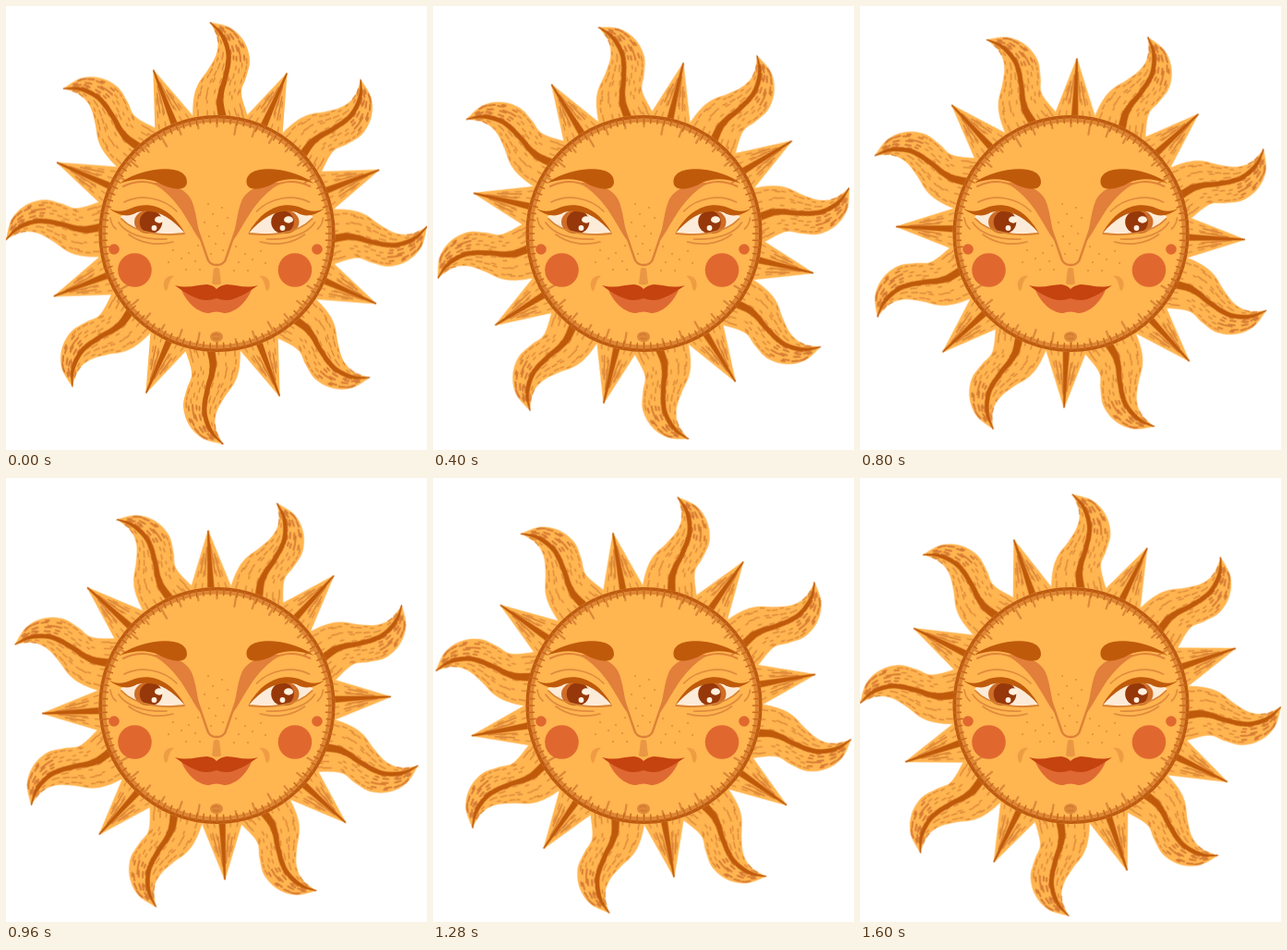
Recreate the animation shown at these times as an HTML page. Size 456x480 px, loop 1680 ms.

```html
<!DOCTYPE html>
<html lang="en">
<head>
<meta charset="utf-8">
<title>Smiling sun</title>
<style>
  html, body { margin: 0; width: 100%; height: 100%; overflow: hidden; background: #fff; }
  svg { display: block; width: 100%; height: 100%; }
  #rays { animation: turn 1680ms infinite; }
  /* One eighth of a turn in held 80 ms poses, with a short rest after the middle. */
  @keyframes turn {
    0%        { transform: rotate(0deg); animation-timing-function: steps(5); }
    23.80952% { transform: rotate(-10.6deg); animation-timing-function: steps(3); }
    38.09524% { transform: rotate(-17.4deg); animation-timing-function: steps(2); }
    47.61905% { transform: rotate(-21.7deg); animation-timing-function: steps(2); }
    57.14286% { transform: rotate(-26.55deg); animation-timing-function: steps(1); }
    61.90476% { transform: rotate(-26.55deg); animation-timing-function: steps(3); }
    76.19048% { transform: rotate(-33.9deg); animation-timing-function: steps(4); }
    95.2381%  { transform: rotate(-42.75deg); animation-timing-function: steps(1); }
    100%      { transform: rotate(-45deg); }
  }
  .gold { fill: #ffb550; }
  .brown { fill: #bf5a0b; }
  .lines { fill: none; stroke-linecap: round; stroke-linejoin: round; }
</style>
</head>
<body>
<svg viewBox="0 0 456 480">
  <defs>
    <g id="wave"></g>
    <g id="spike"></g>
    <g id="halfFace">
      <path fill="#e17f3b" d="M158 191C180 191 195 198 201 210C206 222 207 236 211 254C199 240 190 209 158 191Z"/>
      <path class="lines" stroke="#dc8138" stroke-width="2.4" d="M206 238C212 254 216 267 219 275Q222 280 228 280"/>
      <path class="lines" stroke="#e08337" stroke-width="2" d="M127 195C142 188 157 189 169 196"/>
      <path class="brown" d="M196 190C196 178 181 175 166 176.500C148 178.500 135 183 123 192C140 186 153 186 165 191C177 198 196 202 196 190Z"/>
      <path class="lines" stroke="#e08b3c" stroke-width="1.700" d="M128 212C146 203 170 207 185 222M122 234C130 246 148 253 174 252M133 247C148 258 166 259 181 255M113 229Q114 237 119 241"/>
      <path fill="#fcebd8" d="M124 228C140 214 174 215 193 245C169 248 139 246 124 228Z"/>
      <ellipse cx="153" cy="233.500" rx="14" ry="12.500" fill="#cf6d27"/>
      <circle cx="157" cy="233.500" r="12.300" fill="#96380a"/>
      <path class="brown" d="M111 218C120 224 128 222 137 218C158 210 180 220 194 246C178 227 160 218 142 223C133 229 121 227 111 218Z"/>
      <path class="lines" stroke="#d78336" stroke-width="1.800" d="M125 230C140 246 169 249 193 246"/>
      <path fill="#ef9d42" d="M182 292C172 290 168 301 173 308C177 307 174 298 182 292Z"/>
    </g>
  </defs>

  <g transform="translate(228 245.500)"><g id="rays"></g></g>

  <circle class="gold" cx="228.500" cy="246" r="128"/>
  <g class="lines">
    <path id="marks" stroke="#dd8738" stroke-width="2.200"/>
    <circle cx="228.500" cy="246" r="122.500" stroke="#dd8735" stroke-width="4"/>
    <circle cx="228.500" cy="246" r="126.300" stroke="#bd5b11" stroke-width="3.600"/>
    <path id="ticks" stroke="#c9681d" stroke-width="1.500"/>
  </g>
  <use href="#halfFace"/>
  <use href="#halfFace" transform="translate(456.500) scale(-1 1)"/>
  <g fill="#e0682f">
    <circle cx="139.500" cy="285.500" r="18.300"/><circle cx="313" cy="285.500" r="18.300"/>
    <circle cx="117" cy="263" r="5.800"/><circle cx="337" cy="263" r="5.800"/>
  </g>
  <g fill="#fff0df">
    <ellipse cx="166" cy="231" rx="5" ry="3.700"/><circle cx="160.500" cy="240" r="2.900"/>
    <ellipse cx="306" cy="231" rx="5" ry="3.700"/><circle cx="299.500" cy="240" r="2.900"/>
  </g>
  <path fill="#e99743" d="M225 284Q228 282 231 284L233 300Q228 303 223 300Z"/>
  <path fill="#df6932" d="M190 307C206 313 250 313 266 307C258 325 245 332 236 332Q228 329 220 332C211 332 198 325 190 307Z"/>
  <path fill="#c4430f" d="M183 302C198 306 207 301 218 301Q225 302 228 306Q232 302 239 301C249 301 259 306 273 302C259 312 247 318 239 318Q233 318 228 316Q223 318 217 318C208 318 196 312 183 302Z"/>
  <ellipse cx="228" cy="357.500" rx="7" ry="5.500" fill="#dd8938"/>
  <path class="lines" stroke="#ca702b" d="M224 356q4-3 7 0m-6 3q4 2 6 0"/>
  <path id="freckles" class="lines" stroke="#e28c3a" stroke-width="1.900"/>
</svg>

<script>
  const byId = id => document.getElementById(id);
  const lerp = (a, b, t) => a + (b - a) * t;
  const mix = (p, q, t) => [lerp(p[0], q[0], t), lerp(p[1], q[1], t)];
  const points = list => list.map(p => p.map(v => v.toFixed(2)).join(" ")).join("L");

  let seed = 19;
  const random = () => (seed = (seed * 16807) % 2147483647) / 2147483647;

  // Catmull-Rom curve through the knots, t from 0 to 1.
  function spline(knots, t) {
    const last = knots.length - 1;
    const i = Math.min(Math.floor(t * last), last - 1);
    const u = t * last - i;
    const at = k => knots[Math.max(0, Math.min(last, k))];
    return [0, 1].map(axis => {
      const [a, b, c, d] = [-1, 0, 1, 2].map(k => at(i + k)[axis]);
      return b + u * (c - a + u * (2 * a - 5 * b + 4 * c - d + u * (3 * (b - c) + d - a))) / 2;
    });
  }
  const sample = f => Array.from({ length: 37 }, (_, i) => f(i / 36));
  const band = (a, b) => `M${points(sample(a))}L${points(sample(b).reverse())}Z`;
  const stroke = (d, color, width) =>
    `<path class="lines" d="${d}" stroke="${color}" stroke-width="${width}"/>`;

  // Both rays point up from the centre; curves run from tip to base.
  function drawWave() {
    const left = t => spline([[-7, -228], [1, -211], [0, -194], [-9, -177], [-20, -161], [-25, -144], [-26, -118]], t);
    const right = t => spline([[-7, -228], [15, -222], [30, -207], [36, -187], [32, -168], [27, -150], [37, -118]], t);
    const core = t => spline([[-7, -228], [6, -214], [13, -193], [10, -170], [5, -152], [4, -139], [8, -118]], t);
    const side = sign => t => {
      const [x, y] = core(t);
      return [x + sign * (0.9 + 1.5 * Math.sin(Math.PI * Math.min(t * 2, 0.5)) + 2.6 * t ** 3), y];
    };
    let pale = "", deep = "";
    for (let row = 0; row < 15; row++) {
      for (let lane = 0; lane < 7; lane++) {
        const t = 0.1 + row * 0.058 + random() * 0.05;
        const s = (lane < 3 ? lane / 3 : (lane - 3) / 4) + 0.06 + random() * 0.16;
        const edge = lane < 3 ? left : right;
        const end = Math.min(t + 0.025 + random() * 0.03, 1);
        const dash = `M${points([mix(edge(t), core(t), s), mix(edge(end), core(end), s)])}`;
        if (t < 0.45 && lane > 2) deep += dash;
        else if (random() > 0.2) pale += dash;
      }
    }
    return `<path class="gold" d="${band(left, right)}"/>` +
      stroke(pale, "#e08a3a", 1.5) +
      stroke(deep, "#d87c33", 2) +
      `<path class="brown" d="${band(side(-1), side(1))}"/>`;
  }

  function drawSpike() {
    let streaks = "", dashes = "";
    for (const slope of [-0.62, -0.34, 0.32, 0.6]) {
      const at = t => [24 * slope * t, lerp(-189, -122, t)];
      const from = 0.2 + random() * 0.2;
      streaks += `M${points([at(from), at(0.6 + random() * 0.3)])}`;
      for (let t = 0.45; t < 0.95; t += 0.2) {
        dashes += `M${points([at(t), at(t + 0.09)].map(([x, y]) => [x * 1.25, y]))}`;
      }
    }
    return `<path class="gold" d="M0-190L-25-119L25-119Z"/>` +
      stroke(dashes, "#e18d3c", 1.4) + stroke(streaks, "#da8034", 1.5) +
      `<path class="brown" d="M-.8-189L.8-189Q2.500-155 4-120L-4-120Q-2.500-155-.8-189Z"/>`;
  }

  byId("wave").innerHTML = drawWave();
  byId("spike").innerHTML = drawSpike();
  byId("rays").innerHTML = Array.from({ length: 8 }, (_, i) =>
    `<use href="#spike" transform="rotate(${i * 45 + 23.8})"/>
     <use href="#wave" transform="rotate(${i * 45})"/>`).join("");

  const polar = (angle, r) => [228.5 + r * Math.sin(angle), 246 - r * Math.cos(angle)];
  const spokes = (count, outer, length, keep = () => true) =>
    Array.from({ length: count }, (_, i) => i / count * 2 * Math.PI).filter(keep)
      .map(a => `M${points([polar(a, outer), polar(a, outer - length())])}`).join("");
  byId("ticks").setAttribute("d", spokes(104, 126, () => 6 + random() * 2));
  byId("marks").setAttribute("d",
    spokes(36, 122, () => 6 + random() * 8, a => Math.abs(Math.cos(a)) > 0.45));

  const nose = [[219, 214], [234, 218], [224, 225], [240, 229], [215, 234], [229, 238], [236, 246],
    [220, 249], [227, 257], [235, 264], [222, 268]];
  const cheek = [[208, 259], [198, 267], [205, 276], [190, 273], [181, 264], [176, 277], [195, 285], [210, 285]];
  const dots = [...nose, ...cheek, ...cheek.map(([x, y]) => [457 - x, y + 1])];
  byId("freckles").setAttribute("d", dots.map(p => `M${p}h.1`).join(""));
</script>
</body>
</html>
```
